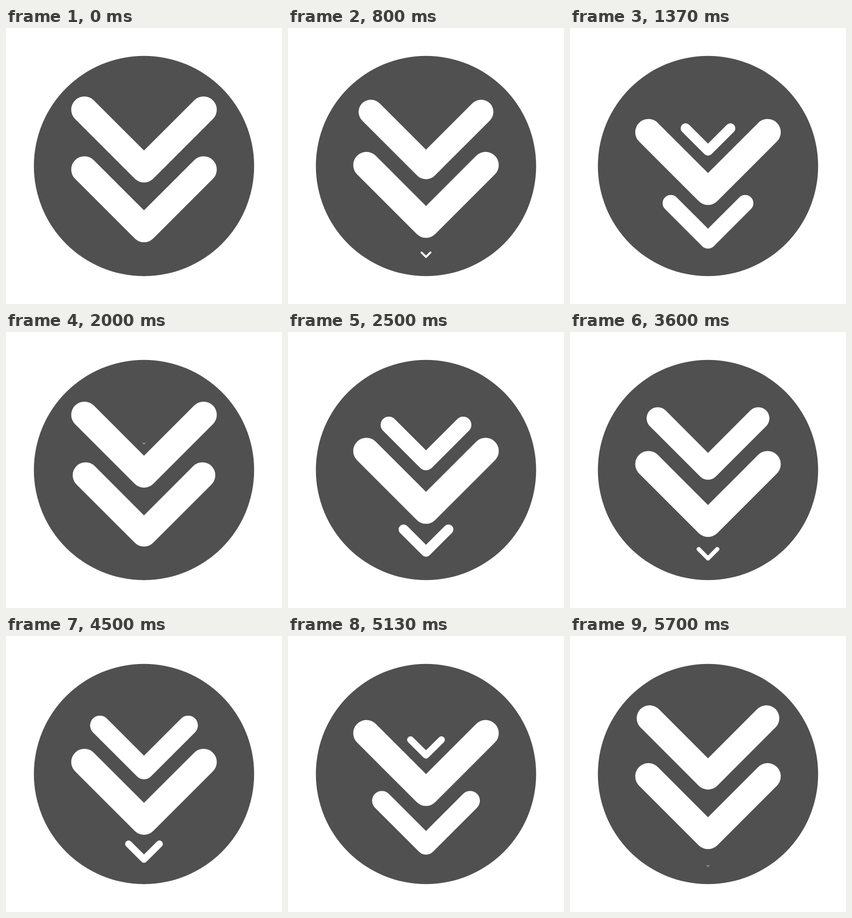
An HTML page that plays this animation: 512x512 px, repeating every 5.73 s.

```html
<!DOCTYPE html>
<html lang="en">
<head>
<meta charset="utf-8">
<title>Scrolling chevrons</title>
<style>
  html, body { margin: 0; width: 100%; height: 100%; overflow: hidden; background: #fff; }
  svg { display: block; width: 100vw; height: 100vh; }
</style>
</head>
<body>
<svg viewBox="0 0 512 512">
  <circle cx="256" cy="256" r="204.3" fill="#505050"/>
  <g fill="none" stroke="#fff" stroke-width="49" stroke-linecap="round" stroke-linejoin="round">
    <path class="chevron"/>
    <path class="chevron"/>
    <path class="chevron"/>
  </g>
</svg>
<script>
  const LOOP = 5730;   // ms
  const STEP = 80;     // ms per pose
  const POSES = 12;    // poses per slide
  const TOP = 206.75;  // centre of the upper slot
  const GAP = 111;     // distance between slots

  const chevrons = [...document.querySelectorAll('.chevron')];
  chevrons.forEach(c => c.setAttribute('d', 'M-110.5 -55.25L0 55.25L110.5 -55.25'));

  const smooth = u => u * u * (3 - 2 * u);

  // Poses start on the next 30 Hz tick, rounded to 10 ms.
  const poseStart = n => Math.round(Math.ceil(n * 12 / 5) * 10 / 3) * 10;

  function poseAt(t) {
    const n = Math.floor(t / STEP);
    return poseStart(n) > t ? n - 1 : n;
  }

  function place(chevron, y, scale) {
    chevron.setAttribute('visibility', scale > 0 ? 'visible' : 'hidden');
    chevron.setAttribute('transform', `translate(256 ${y}) scale(${scale})`);
  }

  function draw(time) {
    const p = smooth(poseAt(time % LOOP) % POSES / POSES);
    place(chevrons[0], TOP, p);                       // grows in
    place(chevrons[1], TOP + GAP * p, 1);             // slides down
    place(chevrons[2], TOP + GAP * (1 + p), 1 - p);   // shrinks away
  }

  function tick() {
    draw(performance.now());
    requestAnimationFrame(tick);
  }
  tick();
</script>
</body>
</html>
```
